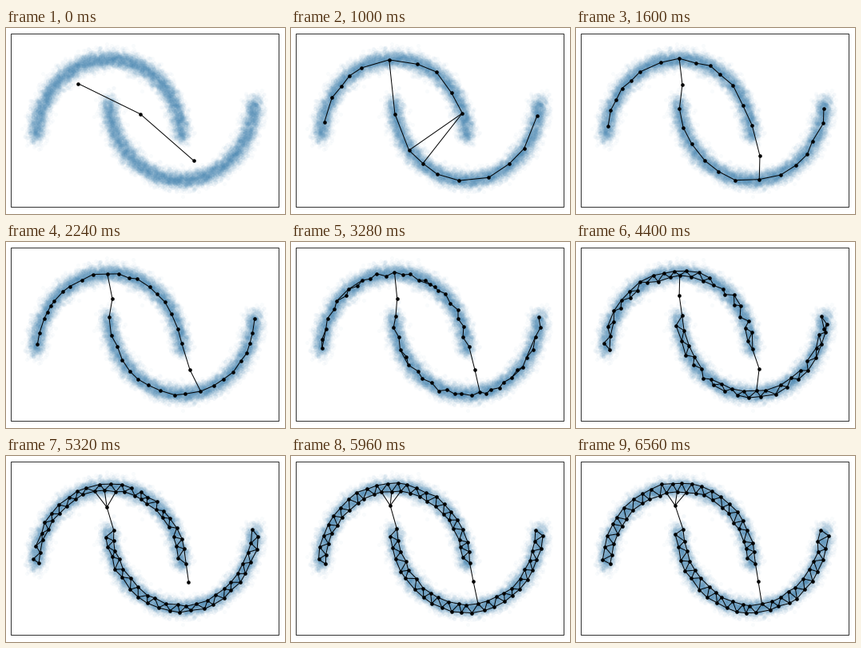
Write a matplotlib script that moves like this. It is 349 by 233 pixels and loops after 6600 ms.

```python
import numpy as np
import matplotlib.pyplot as plt
from matplotlib.animation import FuncAnimation
from matplotlib.collections import LineCollection

W, H, DPI = 349, 233, 100
FRAMES, INTERVAL = 165, 40
PX = 72 / DPI
BLUE = np.array([0x3a, 0x7c, 0xaa]) / 255

# Moon geometry in pixels: centre, radii, direction of the bulge
UPPER = (129, 139, 91, 100, -1)
LOWER = (220, 90, 91, 101, 1)

rng = np.random.default_rng(7)


def moon_xy(moon, theta, offset=0):
    """Points on a moon; theta runs from its left tip (0) to its right tip (pi)."""
    cx, cy, rx, ry, side = moon
    return np.column_stack([cx - (rx + offset) * np.cos(theta),
                            cy + side * (ry + offset) * np.sin(theta)])


def cloud(n=10000, sigma=5.6, alpha=0.028, radius=2):
    """Density picture of many translucent dots scattered along both moons."""
    pts = np.vstack([moon_xy(m, np.linspace(0, np.pi, n)) for m in (UPPER, LOWER)])
    pts += rng.normal(0, sigma, pts.shape)
    grid, _, _ = np.histogram2d(pts[:, 1], pts[:, 0], bins=(H, W),
                                range=((0, H), (0, W)))
    hits = np.zeros_like(grid)
    for dy in range(-radius, radius + 1):
        for dx in range(-radius, radius + 1):
            if dx * dx + dy * dy <= radius * radius + 1:
                hits += np.roll(grid, (dy, dx), (0, 1))
    cover = 1 - (1 - alpha) ** hits
    return 1 - cover[..., None] * (1 - BLUE)


def grow(moon, theta, offset, lead, period=6.2, limit=46):
    """Let a chain of nodes spread over a moon; returns (xy, rank) per frame.

    Nodes are added in pairs in the widest gap, so that neighbours keep
    alternating between the two sides of the band.
    """
    theta, offset = np.array(theta, float), np.array(offset, float)
    first = len(theta)
    rank, wobble = rng.uniform(size=first), rng.uniform(-0.25, 0.25, first)
    history = []
    for f in range(FRAMES):
        if f:
            n = len(theta)
            if n < min(limit - 1, first + 2 * int((f + lead) / period)):
                gap = int(np.argmax(np.diff(np.r_[0, theta, np.pi])))
                a, b = np.r_[0, theta, np.pi][gap:gap + 2]
                theta = np.insert(theta, gap, [a + (b - a) / 3, b - (b - a) / 3])
                offset = np.insert(offset, gap, [offset[min(gap, n - 1)]] * 2)
                rank = np.insert(rank, gap, rng.uniform(size=2))
                wobble = np.insert(wobble, gap, rng.uniform(-0.25, 0.25, 2))
                n += 2
            i = np.arange(n)
            width = np.interp(f, [60, 110, 164], [0.6, 3.5, 5.2])
            slot = np.pi * (i + 0.5 + wobble) / n
            theta += 0.13 * (slot - theta) + rng.normal(0, 0.004, n)
            offset += (0.25 * (np.where(i % 2, width, -width) - offset)
                       + rng.normal(0, 0.6, n))
        history.append((moon_xy(moon, theta, offset), rank))
    return history


upper = grow(UPPER, [1.01, 2.55], [-18, -44], lead=0)
lower = grow(LOWER, [1.79], [-23], lead=3)


def nearest(xy, p, n=1):
    return xy[np.argsort(np.hypot(*(xy - p).T))[:n]]


def drift(f, start, end):
    u = np.clip((f - 80) / 70, 0, 1)
    return np.array(start) + u * (np.array(end) - start)


def network(f):
    """All nodes and edges at one frame."""
    nodes, edges = [], []
    braced = np.interp(f, [70, 110, 140], [0, 0.68, 1])
    for xy, rank in (upper[f], lower[f]):
        edges += list(zip(xy, xy[1:]))
        edges += [(a, b) for r, a, b in zip(rank, xy, xy[2:]) if r < braced]
        nodes.append(xy)
    up, low = nodes
    top, tip = up[np.argmin(abs(up[:, 0] - 130))], up[-1]

    # The two gaps are first crossed directly, then by a node in between
    if f >= 40:
        left = drift(f, (133, 71), (124, 62))
        right = drift(f, (230, 160), (228, 157))
        nodes += [left[None], right[None]]
        ends = nearest(up, left, 3) if f >= 120 else [top]
        edges += [(left, p) for p in ends] + [(left, low[0]), (tip, right)]
        if not 122 <= f < 146:
            edges.append((right, nearest(low, right)[0]))
    else:
        edges += [(tip, p) for p in nearest(low, tip, 2 if f >= 12 else 1)]
        if f >= 15:
            edges.append((top, low[0]))
    return np.vstack(nodes), edges


fig = plt.figure(figsize=(W / DPI, H / DPI), dpi=DPI, facecolor="white")
ax = fig.add_axes([0, 0, 1, 1])
ax.imshow(cloud(), extent=(0, W, H, 0), interpolation="nearest", aspect="auto")
ax.set_xlim(0, W)
ax.set_ylim(H, 0)
ax.axis("off")
ax.add_patch(plt.Rectangle((6.5, 7.5), 335, 217, fill=False, ec="black",
                           lw=0.8 * PX, snap=False))
lines = ax.add_collection(LineCollection([], colors="black", linewidths=PX, zorder=3))
dots, = ax.plot([], [], "o", color="black", ms=4.6 * PX, mew=0, zorder=4)


def draw(f):
    xy, edges = network(f)
    lines.set_segments(edges)
    dots.set_data(xy[:, 0], xy[:, 1])
    return lines, dots


anim = FuncAnimation(fig, draw, frames=FRAMES, interval=INTERVAL,
                     repeat=True, repeat_delay=0)
plt.show()
```
